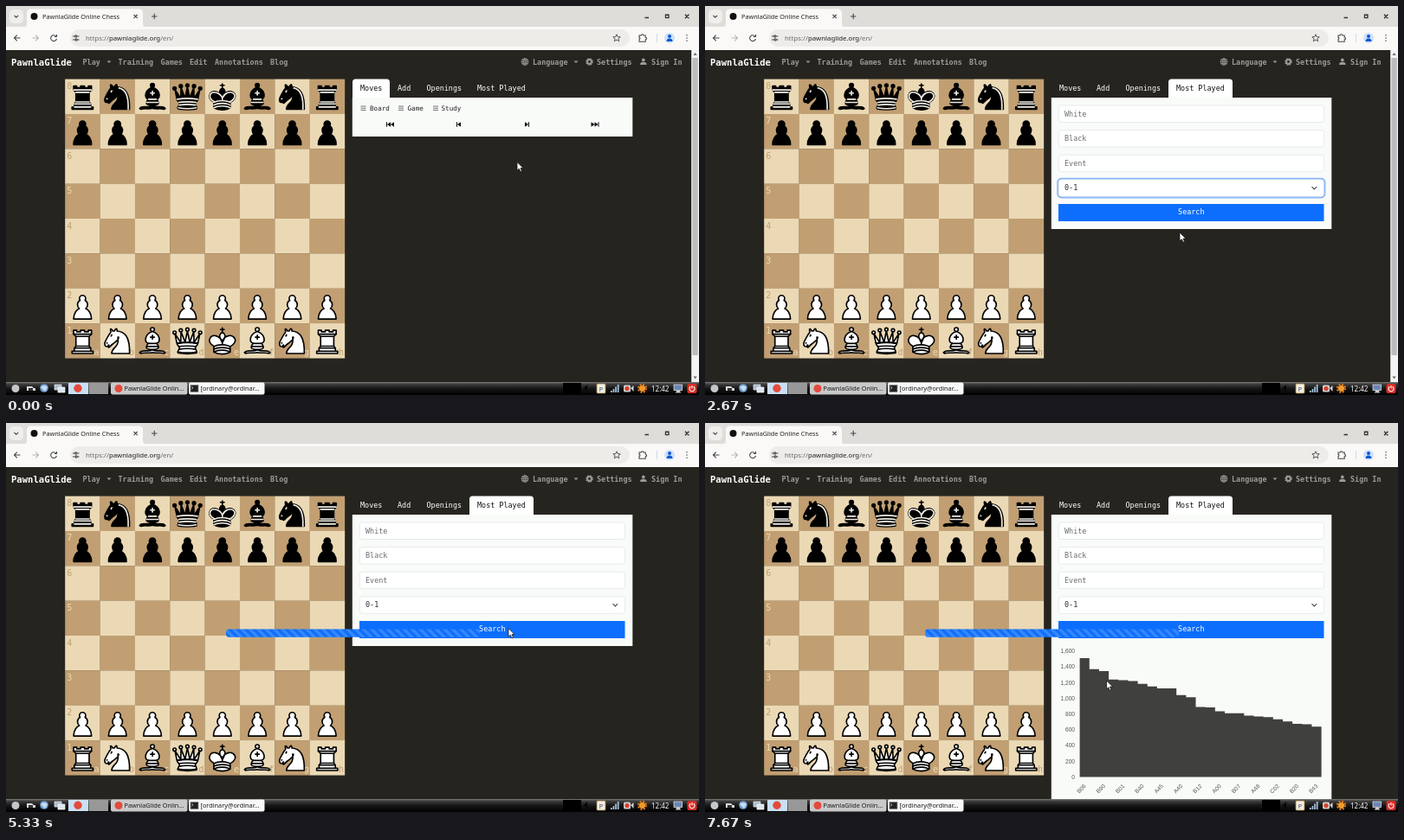
These frames come from a looping animation (800x450 px, 8 s). An HTML page:

```html
<!DOCTYPE html>
<html lang="en">
<head>
<meta charset="utf-8">
<title>PawnlaGlide Online Chess</title>
<style>
  html, body { margin: 0; width: 100%; height: 100%; overflow: hidden; background: #26241f; }
  svg { display: block; }
  text { white-space: pre; }
  .mono { font: 8.44px "DejaVu Sans Mono", monospace; }
  .sans { font: 7.3px "Noto Sans", sans-serif; }
  .axis { font: 6.6px "Liberation Sans", Arial, sans-serif; fill: #555; }
  .coord { font: 10px "DejaVu Sans Mono", monospace; }
  .nav { font-weight: bold; fill: #9c9b99; }
  .line { fill: none; stroke: #44474a; stroke-width: 1.1; }
  .field { fill: #fff; stroke: #dee2e6; stroke-width: .7; }
  .hint { fill: #696d71; }
</style>
</head>
<body>
<svg id="stage" width="800" height="450" viewBox="0 0 800 450">
  <defs>
    <linearGradient id="bar" x2="0" y2="1">
      <stop offset="0" stop-color="#808080"/><stop offset=".14" stop-color="#404040"/>
      <stop offset=".5" stop-color="#161616"/><stop offset="1" stop-color="#000"/>
    </linearGradient>
    <pattern id="stripes" width="9.37" height="9.37" patternUnits="userSpaceOnUse">
      <path transform="scale(9.37)" fill="#fff" fill-opacity=".18" d="M0 0H.5L1 .5V1zM0 1V.5L.5 1z"/>
    </pattern>
  </defs>
  <rect width="800" height="450" fill="#26241f"/>

  <!-- browser frame -->
  <rect width="800" height="25" fill="#dfddd9"/>
  <rect x="4" y="4" width="16" height="16" rx="5" fill="#efeeeb"/>
  <path d="M20 24.500q4 0 4-4V8.500q0-5 5-5H153q5 0 5 5V20.500q0 4 4 4z" fill="#faf9f7"/>
  <rect y="24" width="800" height="27" fill="#faf9f7"/>
  <rect x="74" y="27" width="646" height="20" rx="10" fill="#eeece9"/>
  <circle cx="32.500" cy="12" r="4" fill="#111"/>
  <text class="sans" x="42" y="14.800" fill="#222">PawnlaGlide Online Chess</text>
  <g class="line">
    <path d="M9.500 11l2.300 2.300 2.300-2.300M147.500 10l4.200 4.200m0-4.200l-4.200 4.200M168 12h6.400m-3.200-3.200v6.400"/>
    <path d="M737.500 13.500h4.500M761.500 10.200h3.400v3.400h-3.400zM784 9.800l4.400 4.400m0-4.400l-4.400 4.400" stroke-width="1.400" stroke="#333"/>
    <path d="M16.500 37H9.500m3.300-3.300L9.500 37l3.300 3.300M57.800 35.200a3.400 3.400 0 1 0 .6 2.600M58.500 33v2.500h-2.500"/>
    <path d="M30.500 37h7m-3.300-3.300l3.300 3.300-3.300 3.300" stroke="#b4b7ba"/>
    <path d="M77 35h2.500m2 0h3M77 39h3m2.200 0h2.300"/><circle cx="80.600" cy="35" r="1.100"/><circle cx="81.200" cy="39" r="1.100"/>
    <path stroke-width=".9" d="M705 32.800l1.200 2.800 3 .2-2.300 2 .8 3-2.700-1.700-2.700 1.700.8-3-2.300-2 3-.2z"/>
    <path d="M731 34h2.300a1.300 1.300 0 0 1 2.600 0h2.300v2.300a1.300 1.300 0 0 1 0 2.600v2.300H731v-2.500a1.200 1.200 0 0 0 0-2.300z"/>
  </g>
  <text class="sans" x="92" y="39.800" style="font-size:7.8px" fill="#65696d">https://<tspan fill="#1e1f21">pawnlaglide.org</tspan>/en/</text>
  <path d="M751.500 32v10" stroke="#cdd9ee"/>
  <circle cx="766" cy="37" r="6" fill="#cfe0fb"/>
  <path d="M762.500 41q0-3.500 3.500-3.500t3.500 3.500zM766 33a2 2 0 0 1 0 4 2 2 0 0 1 0-4z" fill="#0b57d0"/>
  <path d="M786 33.800h.01M786 37h.01M786 40.200h.01" stroke="#44474a" stroke-width="1.500" stroke-linecap="round"/>

  <!-- site header -->
  <g class="mono nav">
    <text x="6" y="69" style="font-size:10.57px" fill="#fff">PawnlaGlide</text>
    <text x="88.500" y="67.500">Play</text><text x="129.500" y="67.500">Training</text>
    <text x="178.500" y="67.500">Games</text><text x="212" y="67.500">Edit</text>
    <text x="241" y="67.500">Annotations</text><text x="305" y="67.500">Blog</text>
    <text x="608" y="67.500">Language</text><text x="682" y="67.500">Settings</text><text x="745" y="67.500">Sign In</text>
    <path d="M116.500 63.500h5l-2.500 2.500zM655.500 63.500h5l-2.500 2.500z"/>
    <path d="M735.800 60.500a1.900 1.900 0 0 1 0 3.800 1.900 1.900 0 0 1 0-3.800zM732 68q0-3.300 3.800-3.300t3.800 3.300z"/>
    <circle cx="673.500" cy="64.500" r="2.400" fill="none" stroke="#9c9b99" stroke-width="2"/>
    <circle cx="673.500" cy="64.500" r="3.700" fill="none" stroke="#9c9b99" stroke-width="1.300" stroke-dasharray="1.600 1.300"/>
    <g fill="none" stroke="#9c9b99" stroke-width=".8">
      <circle cx="599" cy="64.500" r="3.900"/><ellipse cx="599" cy="64.500" rx="1.800" ry="3.900"/>
      <path d="M595 64.500h8M595.600 62.500h6.800M595.600 66.500h6.800M599 60.600v7.800"/>
    </g>
  </g>
  <g id="scroll">
    <rect x="791.200" y="51" width="8.800" height="384" fill="#f4f4f4"/>
    <rect id="thumb" x="792.400" y="60" width="6.400" height="344" fill="#bdbdbd"/>
    <path d="M793.400 57h4.400l-2.200-3zM793.400 428.500h4.400l-2.200 3z" fill="#6f6f6f"/>
  </g>

  <g id="board"></g>

  <!-- side panel -->
  <path id="tab" fill="#fff"/>
  <g id="tabs" class="mono"></g>
  <rect id="panel" x="399.800" y="106" width="323.500" height="45" fill="#f9fbf9"/>
  <g id="moves">
    <g class="mono" style="font-size:7.6px" fill="#222">
      <text x="420" y="121">Board</text><text x="463.500" y="121">Game</text><text x="502.500" y="121">Study</text>
    </g>
    <path d="M409.500 116h6m-6 2.200h6m-6 2.200h6M453 116h6m-6 2.200h6m-6 2.200h6M493 116h6m-6 2.200h6m-6 2.200h6" stroke="#555" stroke-width=".8"/>
    <path fill="#111" d="M439 134.300h1v5.400h-1zM444 134.300v5.400l-4-2.700zM448 134.300v5.400l-4-2.700zM520 134.300h1v5.400h-1zM525 134.300v5.400l-4-2.700zM603 134.300h1v5.400h-1zM599 134.300v5.400l4-2.700zM683.500 134.300h1v5.400h-1zM675.500 134.300v5.400l4-2.700zM679.500 134.300v5.400l4-2.700z"/>
  </g>
  <g id="search" class="mono">
    <rect class="field" x="408.300" y="115" width="306" height="19.500" rx="3"/><text class="hint" x="415" y="127.500">White</text>
    <rect class="field" x="408.300" y="143.600" width="306" height="19.500" rx="3"/><text class="hint" x="415" y="156">Black</text>
    <rect class="field" x="408.300" y="172.200" width="306" height="19.500" rx="3"/><text class="hint" x="415" y="184.700">Event</text>
    <rect id="ring" x="407.300" y="199.800" width="308" height="21.500" rx="4" fill="none" stroke="#86b7fe" stroke-width="2.200"/>
    <rect class="field" x="408.300" y="200.800" width="306" height="19.500" rx="3"/>
    <text id="result" x="415" y="213.300" fill="#24282c"></text>
    <path class="line" d="M700.500 209.200l2.800 2.800 2.800-2.800"/>
    <rect id="button" x="408" y="229" width="306.500" height="20"/>
    <text x="561.300" y="241.400" text-anchor="middle" fill="#fff">Search</text>
  </g>
  <g id="chart"></g>
  <g id="menu" class="mono"></g>
  <g id="progress">
    <rect x="254" y="238.400" width="293" height="9.370" rx="3.500" fill="#0d6efd"/>
    <rect id="moving" width="293" height="9.370" rx="3.500" fill="url(#stripes)" transform="translate(254 238.400)"/>
  </g>

  <!-- taskbar -->
  <rect y="435" width="800" height="15" fill="url(#bar)"/>
  <circle cx="11" cy="442.500" r="4.500" fill="#c3c7c9"/>
  <path d="M24 440h6l2 2h2v3H24z" fill="#d8d8d8"/><path d="M26 442h5v3h-5z" fill="#333"/>
  <circle cx="44" cy="442" r="4.800" fill="#6f9fd0"/><path d="M40 441q4-4 8 0l-3 5z" fill="#c8dcf0"/>
  <path d="M56 438h8v6h-8z" fill="#a9bccf" stroke="#eee" stroke-width=".7"/><path d="M60 441h8v6h-8z" fill="#d9e4ee" stroke="#fff" stroke-width=".7"/>
  <rect x="72" y="436" width="23" height="13" fill="#c9e0f3"/><rect x="95.500" y="436" width="22.500" height="13" fill="#989898"/>
  <circle cx="83" cy="442.300" r="4.700" fill="#e34a3b"/>
  <rect x="121" y="435.500" width="88.500" height="14" rx="2" fill="#c9c9c9"/>
  <circle cx="130" cy="442.500" r="4.500" fill="#e34a3b"/>
  <rect x="211" y="435.500" width="87.500" height="14" rx="2" fill="#f8f8f8"/>
  <rect x="213" y="438.500" width="9" height="8" fill="#222" stroke="#888" stroke-width=".8"/><path d="M214.500 440.500l1.500 1.200-1.500 1.200" stroke="#fff" stroke-width=".7" fill="none"/>
  <g class="sans" fill="#1b1b1b"><text x="136.500" y="445.200">PawnlaGlide Onlin...</text><text x="224.500" y="445.200">[ordinary@ordinar...</text></g>
  <rect x="643" y="436" width="21" height="12.500" fill="#000"/>
  <path d="M667 442l4-4v8z" fill="#050505"/>
  <rect x="682" y="437" width="10" height="11" rx="1" fill="#f3eee0" stroke="#a07d3d" stroke-width=".8"/>
  <text class="sans" x="684.700" y="445.500" font-weight="bold" fill="#2f4b78">P</text>
  <path d="M698 445h1.700v2H698zM700.600 443h1.700v4h-1.700zM703.200 440.500h1.700v6.500h-1.700zM705.800 438h1.700v9h-1.700z" fill="#a9c8e4"/>
  <rect x="713" y="438.500" width="8" height="8" rx="1.500" fill="#cfcfcf"/><path d="M721 442l3.500-3v7z" fill="#cfcfcf"/><circle cx="717" cy="442.500" r="2.600" fill="#d8402c"/>
  <circle cx="734.500" cy="442.300" r="3.600" fill="#f19a2a"/><circle cx="734.500" cy="442.300" r="4.700" fill="none" stroke="#e87b1c" stroke-width="1.800" stroke-dasharray="2 1.700"/>
  <text class="sans" x="745" y="445.500" style="font-size:8px" fill="#f4f4f4">12:42</text>
  <rect x="771" y="438" width="9.500" height="6.500" fill="#6c86b5" stroke="#ddd" stroke-width=".8"/><path d="M773 447.500h6l-1-2.500h-4z" fill="#ccc"/>
  <rect x="786.500" y="437" width="11" height="11" rx="2" fill="#d92d27"/>
  <path d="M790.300 440.300a3 3 0 1 0 3.400 0M792 439v3.500" fill="none" stroke="#fff" stroke-width="1.100"/>

  <g id="cursor" stroke="#151515" stroke-width=".8" stroke-linejoin="round" fill="#fff">
    <path id="arrow" d="M0 0v9.800l2.300-2.100 1.500 3.600 1.700-.7-1.500-3.500h3.100z"/>
    <path id="hand" d="M-1 .8Q0-.6 1 .8V4.200l4 .9q1.300.4 1.200 1.800L5.400 10H-.8L-3.400 6.300q.3-1.600 2.400 0z"/>
  </g>
</svg>
<script>
const $ = id => document.getElementById(id);
const show = (id, on) => { $(id).style.display = on ? '' : 'none'; };
const text = (x, y, s, attrs = '') => `<text x="${x}" y="${y}" ${attrs}>${s}</text>`;

// Pieces on a 45-unit square: [body, inner lines]
const queenTips = [[6, 12], [14, 9], [22.5, 8], [31, 9], [39, 12]]
  .map(([x, y]) => `M${x - 2} ${y}a2 2 0 1 1 4 0 2 2 0 1 1-4 0z`).join('');
const pieces = {
  p: ['M22.5 9c-2.21 0-4 1.79-4 4 0 .89.29 1.71.78 2.38C17.33 16.5 16 18.59 16 21c0 2.03.94 3.84 2.41 5.03C15.41 27.09 11 31.58 11 39.5h23c0-7.92-4.41-12.41-7.41-13.47C28.06 24.84 29 23.03 29 21c0-2.41-1.33-4.5-3.28-5.62.49-.67.78-1.49.78-2.38 0-2.21-1.79-4-4-4z', ''],
  r: ['M9 39h27v-3h-3v-4l-2-2.5V17l3-3V9h-4v2h-5V9h-5v2h-5V9h-4v5l3 3v12.5L12 32v4H9z', 'M12 36h21M12 32h21M14 29.5h17M14 17h17M11 14h23'],
  n: ['M22 10c10.5 1 16.5 8 16 29H15c0-9 10-6.5 8-21M24 18c.38 2.91-5.55 7.37-8 9-3 2-2.82 4.34-5 4-1.04-.94 1.41-3.04 0-3-1 0 .19 1.23-1 2-1 0-4 1-4-4 0-2 6-12 6-12s1.89-1.9 2-3.5c-.73-1-.5-2-.5-3 1-1 3 2.5 3 2.5h2s.78-2 2.5-3c1 0 1 3 1 3', 'M8.800 25.500h.4M14.300 16.500l.8-1.500'],
  b: ['M9 36c3.39-.97 10.11.43 13.5-2 3.39 2.43 10.11 1.03 13.5 2 0 0 1.65.54 3 2-.68.97-1.65.99-3 .5-3.39-.97-10.11.46-13.5-1-3.39 1.46-10.11.03-13.5 1-1.35.49-2.32.47-3-.5 1.35-1.94 3-2 3-2zM15 32c2.500 2.500 12.500 2.500 15 0 .5-1.500 0-2 0-2 0-2.500-2.500-4-2.500-4 5.500-1.500 6-11.500-5-15.500-11 4-10.500 14-5 15.500 0 0-2.500 1.500-2.500 4 0 0-.5.500 0 2zM25 8a2.500 2.500 0 1 1-5 0 2.500 2.500 0 1 1 5 0z', 'M17.500 26h10M15 30h15M22.500 15.500v5M20 18h5'],
  q: ['M9 26c8.500-1.500 21-1.500 27 0l2.500-12.500L31 25l-.3-14.100-5.200 13.600-3-14.500-3 14.500-5.200-13.600L14 25 6.500 13.500zM9 26c0 2 1.500 2 2.500 4 1 1.500 1 1 .5 3.500-1.500 1-1.500 2.500-1.500 2.500-1.500 1.500.5 2.500.5 2.500 6.500 1 16.500 1 23 0 0 0 1.500-1 0-2.500 0 0 .5-1.500-1-2.500-.5-2.500-.5-2 .5-3.500 1-2 2.500-2 2.500-4-8.500-1.500-18.500-1.500-27 0z' + queenTips, 'M9.500 26c8-1.500 18-1.500 26 0M11.500 30c3.500-1 18.500-1 22 0M12 33.500c6-1 15-1 21 0M11 37c7 1.300 16 1.300 23 0'],
  k: ['M22.500 11.600V6M20 8h5M22.500 25s4.500-7.500 3-10.500c0 0-1-2.500-3-2.500s-3 2.500-3 2.500c-1.500 3 3 10.500 3 10.500M11.500 37c5.500 3.500 15.500 3.500 21 0v-7s9-4.500 6-10.500c-4-6.500-13.500-3.500-16 4V27v-3.500c-3.500-7.500-13-10.500-16-4-3 6 5 10 5 10z', 'M11.500 30c5.500-3 15.500-3 21 0m-21 3.500c5.500-3 15.500-3 21 0m-21 3.500c5.500-3 15.500-3 21 0']
};
const blackKing = 'M32 29.500s8.500-4 6-9.650C34.150 14 25 18 22.500 24.500v2.100-2.100C20 18 9.900 14 7 19.850c-2.500 5.650 4.850 9 4.850 9';
const blackKnight = 'M24.500 11.500c8 1.500 12.500 9 11.800 27.500';

function piece(kind, white, x, y) {
  let [body, lines] = pieces[kind];
  if (!white && kind === 'k') lines += blackKing;
  if (!white && kind === 'n') lines += blackKnight;
  return `<g transform="translate(${x} ${y}) scale(.896)" stroke-width="1.85" stroke-linecap="round" stroke-linejoin="round">
    <path d="${body}" fill="${white ? '#fff' : '#000'}" stroke="#000"/>
    <path d="${lines}" fill="none" stroke="${white ? '#000' : '#f0ece4'}"/></g>`;
}

function drawBoard() {
  const size = 40.35, left = 68.2, top = 84.6, tones = ['#ebd9b5', '#c19f72'];
  let squares = '', men = '';
  for (let row = 0; row < 8; row++) for (let col = 0; col < 8; col++) {
    const x = left + col * size, y = top + row * size, dark = (row + col) % 2;
    squares += `<rect x="${x}" y="${y}" width="40.5" height="40.5" fill="${tones[dark]}"/>`;
    const ink = `class="coord" fill="${tones[1 - dark]}"`;
    if (col === 0) squares += text(x + 2, y + 11.5, 8 - row, ink);
    if (row === 7) squares += text(x + size - 7, y + size - 3, 'abcdefgh'[col], ink);
    if (row < 2 || row > 5)
      men += piece(row === 0 || row === 7 ? 'rnbqkbnr'[col] : 'p', row > 5, x, y);
  }
  $('board').innerHTML = squares + men;
}

function drawChart() {
  const values = [1510, 1370, 1345, 1240, 1230, 1220, 1185, 1150, 1125, 1125, 1040, 1015, 890, 885,
    835, 810, 810, 780, 770, 760, 735, 705, 675, 670, 640];
  const codes = 'B06 B90 B01 B40 A45 A40 B12 A00 B07 A48 C02 B20 B43'.split(' ');
  const base = 409.6, step = 11.16, left = 432.6;
  let out = '', d = `M${left} ${base}`;
  for (let v = 0; v <= 1600; v += 200)
    out += text(427, base + 2.3 - v * .0911, v.toLocaleString('en-US'), 'class="axis" text-anchor="end"');
  values.forEach(v => { d += `V${base - v * .0911}h${step}`; });
  out += `<path d="${d}V${base}z" fill="#40403f"/>`;
  codes.forEach((code, i) => {
    const x = left + (i * 2 + .5) * step + 2;
    out += text(x, 420.5, code, `class="axis" text-anchor="end" transform="rotate(-45 ${x} 420.5)"`);
  });
  $('chart').innerHTML = out;
}

function drawTabs(searching) {
  const [l, r] = searching ? [535, 609] : [400, 443];
  $('tab').setAttribute('d', `M${l} 106.500V88q0-3.500 3.500-3.500H${r - 3.5}q3.500 0 3.500 3.500V106.500z`);
  $('tabs').innerHTML = [['Moves', 409], ['Add', 452], ['Openings', 485.5], ['Most Played', 544]]
    .map(([name, x], i) => text(x, 98, name, `fill="${i === (searching ? 3 : 0) ? '#111' : '#fff'}"`)).join('');
}

function drawMenu(picked) {
  $('menu').innerHTML = '<rect x="408.400" y="221" width="305.800" height="57" fill="#fff" stroke="#808080" stroke-width=".7"/>' +
    ['Result', '1-0', '1/2-1/2', '0-1'].map((name, i) => {
      const on = i === picked, y = 221.4 + i * 14.1;
      return (on ? `<rect x="408.800" y="${y}" width="305" height="14.100" fill="#2f7fe0"/>` : '') +
        text(415, y + 10.1, name, `fill="${on ? '#fff' : '#222'}"`);
    }).join('');
}

// Screen steps: start time, pointer position and what differs from an idle page
const steps = [
  [0, 590, 180.5, {}],
  [330, 573, 103, { hand: 1 }],
  [670, 571.5, 92, { hand: 1, tab: 1, fade: .6 }],
  [1000, 571.5, 92, { hand: 1, tab: 1 }],
  [1330, 563, 171, { tab: 1 }],
  [1670, 559, 214, { tab: 1 }],
  [2000, 558, 218, { tab: 1, ring: 1, menu: 1, pick: 0 }],
  [2330, 520, 267, { tab: 1, ring: 1, menu: 1, pick: 3 }],
  [2670, 548, 262, { tab: 1, ring: 1, done: 1 }],
  [3000, 580.5, 237.5, { tab: 1, ring: 1, done: 1, hover: 1, hand: 1 }],
  [3330, 580.5, 237.5, { tab: 1, ring: .5, done: 1, hover: 1, hand: 1 }],
  [3670, 580, 237.5, { tab: 1, done: 1, busy: 1 }],
  [5670, 580.5, 237.5, { tab: 1, done: 1, chart: 1, hover: 1, hand: 1 }],
  [6000, 494, 269, { tab: 1, done: 1, chart: 1 }],
  [6330, 474, 285, { tab: 1, done: 1, chart: 1 }],
  [6670, 463.5, 298, { tab: 1, done: 1, chart: 1 }],
  [7000, 463.5, 298, { tab: 1, done: 1, chart: 1, busy: 1 }]
];

function apply([, x, y, s]) {
  $('cursor').setAttribute('transform', `translate(${x} ${y})`);
  show('hand', s.hand);
  show('arrow', !s.hand);
  drawTabs(s.tab);
  show('moves', !s.tab);
  show('search', s.tab);
  $('search').style.opacity = s.fade || 1;
  $('panel').setAttribute('height', s.chart ? 330 : s.tab ? 152 : 45);
  $('thumb').setAttribute('height', s.chart ? 330 : 344);
  $('result').textContent = s.done ? '0-1' : 'Result';
  $('ring').style.opacity = s.ring || 0;
  $('button').setAttribute('fill', s.hover ? '#0b5cd6' : '#0d6efd');
  show('menu', s.menu);
  drawMenu(s.pick);
  show('chart', s.chart);
  show('progress', s.busy);
  show('scroll', !s.busy);
}

let current;
function tick() {
  const t = performance.now() % 8000;
  const step = steps.findLast(s => s[0] <= t);
  if (step !== current) apply(current = step);
  // Stripes slide one tile left per second, refreshed three times a second
  const beat = Math.floor(t * 3 / 1000 + .01) / 3;
  $('stripes').setAttribute('patternTransform', `translate(${-9.37 * (beat % 1)} 0)`);
  requestAnimationFrame(tick);
}

drawBoard();
drawChart();
tick();
</script>
</body>
</html>
```
